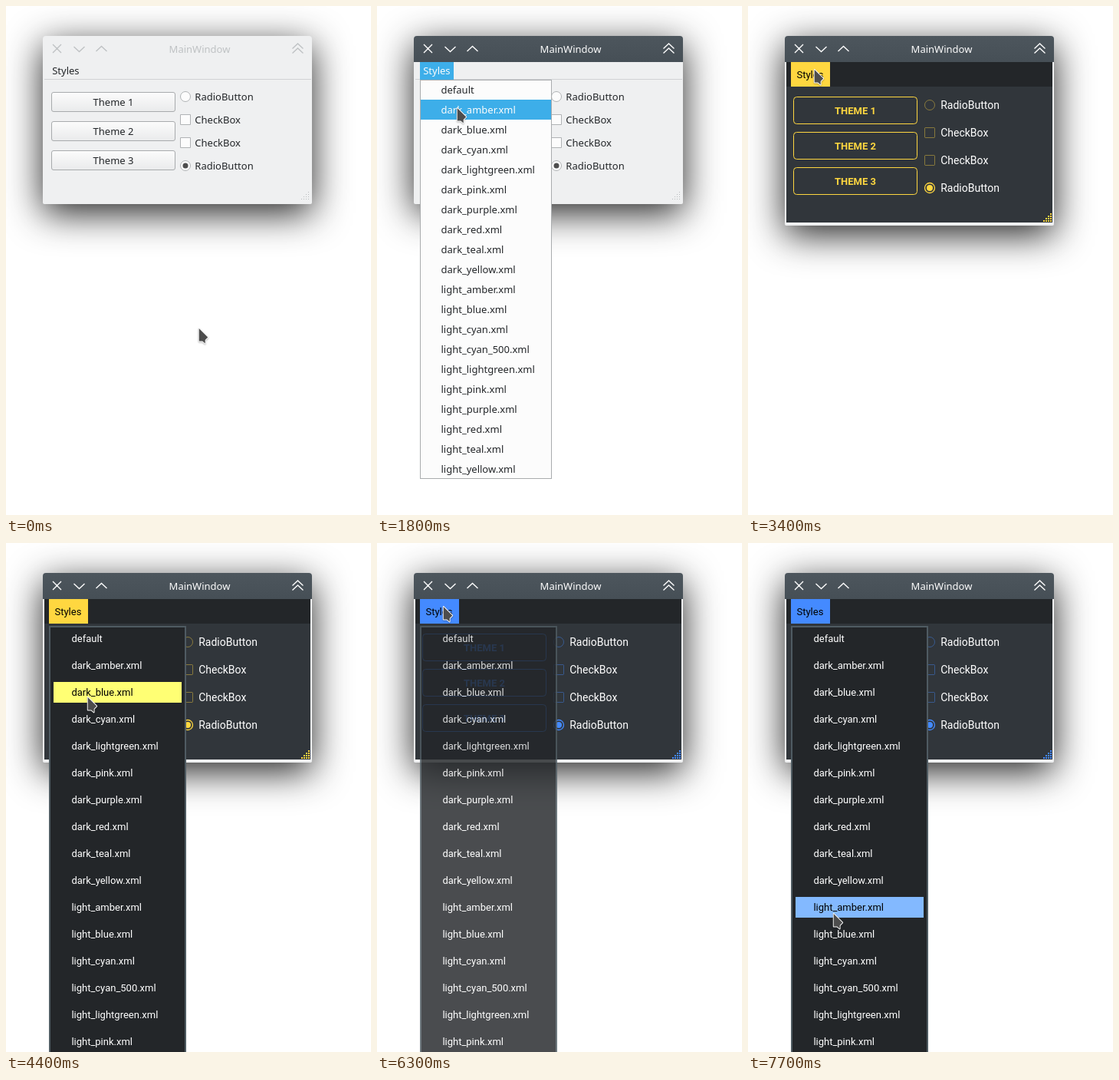
An HTML page with a canvas for the animation above (8 s loop, 476 by 663 pixels).

```html
<!DOCTYPE html>
<html lang="en">
<head>
<meta charset="utf-8">
<title>Theme menu</title>
<style>
  html, body { margin: 0; width: 476px; height: 663px; overflow: hidden; background: #fff; }
  canvas { display: block; }
</style>
</head>
<body>
<canvas id="stage" width="476" height="663"></canvas>
<script>
const W = 476, H = 663, LOOP = 8000, TICK = 100, FADE = 330;
const stage = document.getElementById('stage').getContext('2d');
const menuLayer = document.createElement('canvas');
menuLayer.width = W;
menuLayer.height = H;
const menuCtx = menuLayer.getContext('2d');

const NOTO = '13px "Noto Sans", sans-serif';
const ROBOTO = 'Roboto, sans-serif';
const LIGHT = null;
const AMBER = { primary: '#ffd740', bright: '#ffff74' };
const BLUE = { primary: '#448aff', bright: '#83b9ff' };

const colours = 'amber blue cyan lightgreen pink purple red teal yellow'.split(' ');
const styleNames = [
  'default',
  ...colours.map(c => `dark_${c}.xml`),
  ...colours.flatMap(c => c === 'cyan' ? ['light_cyan.xml', 'light_cyan_500.xml'] : [`light_${c}.xml`])
];

// Each visit to the menu ends by applying the next theme
const visits = [
  { theme: LIGHT, open: 1100, close: 2100, apply: 2600 },
  { theme: AMBER, open: 3700, close: 4700, apply: 5000 },
  { theme: BLUE, open: 6030, close: Infinity, apply: Infinity }
];

const home = { x: 251, y: 420 };
const moves = [
  { from: 300, to: 1000, x: 86, y: 89, bow: 100 },
  { from: 1400, to: 1900, x: 105, y: 135 },
  { from: 3100, to: 3400, x: 86, y: 83 },
  { from: 3900, to: 4400, x: 106, y: 201 },
  { from: 5400, to: 6100, x: 86, y: 83 },
  { from: 6600, to: 7700, x: 111, y: 483 }
];

const clamp = v => Math.min(1, Math.max(0, v));
const easeOut = k => 1 - (1 - k) ** 2;

function pointerAt(t) {
  let { x, y } = home;
  for (const move of moves) {
    const linear = clamp((t - move.from) / (move.to - move.from)), k = easeOut(linear);
    x += (move.x - x) * k + (move.bow || 0) * Math.sin(Math.PI * linear);
    y += (move.y - y) * k;
  }
  return [Math.round(x), Math.round(y)];
}

const menuAlpha = ({ open, close }, t) => clamp((t - open) / FADE) * clamp(1 - (t - close) / FADE);

function rect(g, x, y, w, h, fill) {
  g.fillStyle = fill;
  g.fillRect(x, y, w, h);
}

function label(g, text, x, y, font, fill, align = 'left') {
  g.font = font;
  g.fillStyle = fill;
  g.textAlign = align;
  g.fillText(text, x, y);
}

function shape(g, build, fill, stroke, width = 1) {
  g.beginPath();
  build();
  if (fill) { g.fillStyle = fill; g.fill(); }
  if (stroke) { g.strokeStyle = stroke; g.lineWidth = width; g.stroke(); }
}

const roundBox = (g, x, y, w, h, r, fill, stroke) =>
  shape(g, () => g.roundRect(x + .5, y + .5, w - 1, h - 1, r), fill, stroke);

const disc = (g, x, y, r, fill, stroke, width) =>
  shape(g, () => g.arc(x, y, r, 0, 2 * Math.PI), fill, stroke, width);

function lines(g, stroke, ...polylines) {
  shape(g, () => polylines.forEach(points =>
    points.forEach(([x, y], i) => i ? g.lineTo(x, y) : g.moveTo(x, y))), null, stroke, 1.4);
}

function gradient(g, y0, y1, from, to) {
  const fill = g.createLinearGradient(0, y0, 0, y1);
  fill.addColorStop(0, from);
  fill.addColorStop(1, to);
  return fill;
}

function drawFrame(g, bottom, active) {
  g.save();
  g.shadowColor = 'rgba(0,0,0,.86)';
  g.shadowBlur = 48;
  g.shadowOffsetY = 12;
  shape(g, () => g.roundRect(48, 39, 351, bottom - 39, [4, 4, 2, 2]), '#eff0f1');
  g.restore();
  if (active) {
    shape(g, () => g.roundRect(48, 39, 351, 34, [4, 4, 0, 0]), gradient(g, 39, 73, '#4d565d', '#464f56'));
  }
  const ink = active ? '#fcfcfc' : '#bfc2c4';
  label(g, 'MainWindow', 252.5, 61, NOTO, ink, 'center');
  const chevron = (x, y, h) => [[x - 7, y], [x, y + h], [x + 7, y]];
  lines(g, ink,
    [[61, 50], [72, 61]], [[72, 50], [61, 61]],
    chevron(95.5, 53, 6.5), chevron(124.5, 59, -6.5),
    chevron(380.5, 55.5, -6.5), chevron(380.5, 61.5, -6.5));
}

function drawGrip(g, right, bottom, fill, size) {
  for (let r = 0; r < 4; r++) {
    for (let c = 0; c <= r; c++) rect(g, right - 3 * c, bottom - 3 * (3 - r), size, size, fill);
  }
}

function drawLight(g, bottom, open) {
  const ink = '#232629', edge = '#b0b3b5';
  rect(g, 50, 95, 348, 1, '#d0d2d4');
  if (open) rect(g, 56, 73, 44, 23, '#3daee9');
  label(g, 'Styles', 60.2, 89, NOTO, open ? '#fcfcfc' : ink);
  for (let i = 0; i < 3; i++) {
    const y = 112 + 38 * i;
    roundBox(g, 59, y, 162, 26, 2.5, gradient(g, y, y + 26, '#fcfcfc', '#e9eaeb'), '#a8abad');
    label(g, `Theme ${i + 1}`, 140, y + 18, NOTO, ink, 'center');
  }
  for (let i = 0; i < 4; i++) {
    const y = 118 + 30 * i, radio = i % 3 === 0;
    if (radio) disc(g, 234, y, 6.5, '#fcfcfc', edge);
    else roundBox(g, 227, y - 7, 14, 14, 0, '#fcfcfc', edge);
    label(g, radio ? 'RadioButton' : 'CheckBox', 246.3, y + 5, NOTO, ink);
  }
  disc(g, 234, 208, 3.5, '#4d4d4d');
  drawGrip(g, 394, 251, '#b8bbbd', 1);
  if (bottom > 258) rect(g, 50, 258, 347, 1, '#85888a');
}

function drawDark(g, { primary }, open) {
  rect(g, 50, 73, 347, 209, '#31363b');
  rect(g, 50, 73, 347, 32, '#232629');
  if (open) rect(g, 56, 73, 51, 32, primary);
  label(g, 'Styles', 63.5, 94, '13px ' + ROBOTO, open ? '#000' : '#fff');
  for (let i = 0; i < 3; i++) {
    const y = 118 + 46 * i;
    roundBox(g, 59, y, 162, 36, 4, null, primary);
    label(g, `THEME ${i + 1}`, 140, y + 23, 'bold 13px ' + ROBOTO, primary, 'center');
  }
  for (let i = 0; i < 4; i++) {
    const y = 129 + 36 * i, radio = i % 3 === 0;
    g.globalAlpha = i < 3 ? .42 : 1;
    if (radio) disc(g, 237, y, 6.5, null, primary, i ? 1.3 : 1);
    else roundBox(g, 230, y - 7, 14, 14, 1, null, primary);
    g.globalAlpha = 1;
    label(g, radio ? 'RadioButton' : 'CheckBox', 251.2, y + 5, '14px ' + ROBOTO, '#fff');
  }
  disc(g, 237, 237, 4, primary);
  drawGrip(g, 394, 279, primary, 2);
}

function drawMenu(g, theme, pointerY) {
  g.clearRect(0, 0, W, H);
  const top = theme ? 107 : 96, pitch = theme ? 35 : 26;
  const current = Math.floor((pointerY - top) / pitch);
  if (theme) {
    rect(g, 56, 108, 179, H, '#4f5b62');
    rect(g, 58, 110, 175, H, '#232629');
  } else {
    rect(g, 56, 96, 172, 520, '#a9acae');
    rect(g, 57, 97, 170, 518, '#fcfcfc');
  }
  styleNames.forEach((name, i) => {
    const y = top + pitch * i, on = i === current;
    if (theme) {
      if (on) rect(g, 62, y + 4, 167, 27, theme.bright);
      label(g, name, 85.4, y + 22, '13px ' + ROBOTO, on ? '#000' : '#fff');
    } else {
      if (on) rect(g, 57, y, 170, pitch, '#3daee9');
      label(g, name, 83.5, y + 18, NOTO, on ? '#fcfcfc' : '#232629');
    }
  });
}

function drawPointer(g, x, y) {
  g.save();
  g.translate(x + .7, y);
  g.lineJoin = 'round';
  g.shadowColor = 'rgba(0,0,0,.3)';
  g.shadowBlur = 2;
  g.shadowOffsetY = 1;
  const arrow = () => {
    g.moveTo(0, 0);
    [[0, 16.5], [4.5, 16.5], [8, 19.5], [8, 15], [11.5, 11.5]].forEach(p => g.lineTo(...p));
    g.closePath();
  };
  shape(g, arrow, null, '#fcfcfc', 1.8);
  g.shadowColor = 'transparent';
  shape(g, arrow, '#4d4d4d');
  g.restore();
}

function draw(t) {
  const g = stage, [x, y] = pointerAt(t);
  const { theme, open, close } = visits.find(v => t < v.apply);
  const highlighted = t > open || theme && y < 105;
  const bottom = theme ? 286 : t > close + 200 ? 264 : 258;
  rect(g, 0, 0, W, H, '#fff');
  drawFrame(g, bottom, t > visits[0].open);
  if (theme) drawDark(g, theme, highlighted);
  else drawLight(g, bottom, highlighted);

  const visit = visits.findLast(v => t > v.open);
  if (visit) {
    drawMenu(menuCtx, visit.theme, y);
    g.globalAlpha = menuAlpha(visit, t);
    g.drawImage(menuLayer, 0, 0);
    g.globalAlpha = 1;
  }
  drawPointer(g, x, y);
}

const begin = performance.now();
function tick() {
  const t = (performance.now() - begin) % LOOP;
  draw(Math.floor(t / TICK) * TICK);
  requestAnimationFrame(tick);
}
tick();
</script>
</body>
</html>
```
